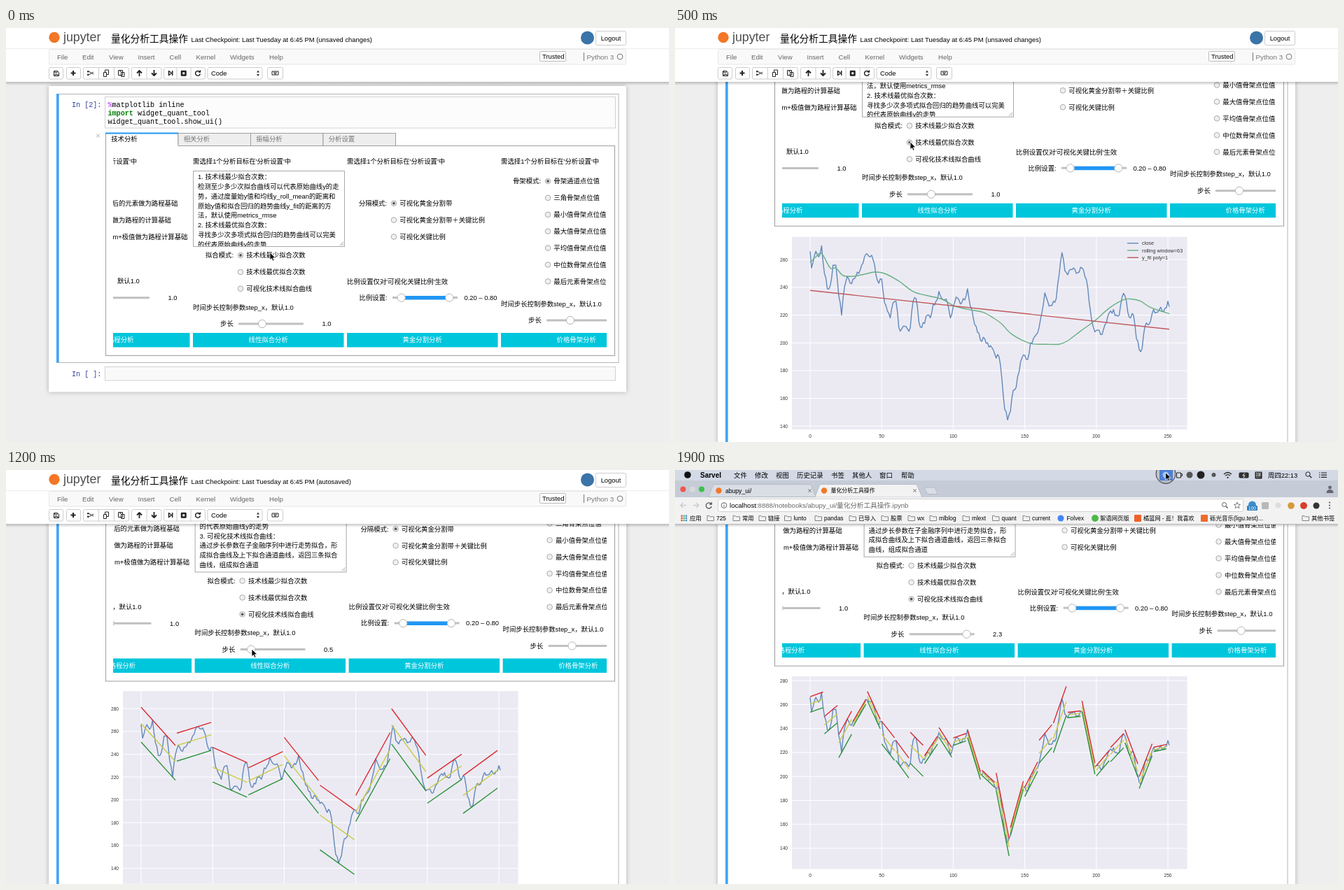
An HTML page that plays this animation: 947x592 px, repeating every 2 s.

```html
<!DOCTYPE html>
<html lang="zh">
<head>
<meta charset="utf-8">
<title>量化分析工具操作</title>
<style>
html, body { margin: 0; width: 100%; height: 100%; overflow: hidden; background: #eee; }
svg { display: block; width: 947px; height: 592px; }
text { font: 9.4px "Liberation Sans", "Noto Sans CJK SC", "Noto Sans CJK", sans-serif; white-space: pre; }
text.mono { font-family: "Liberation Mono", monospace; }
</style>
</head>
<body>
<svg id="stage" viewBox="0 0 947 592"></svg>
<script>
const stage = document.getElementById('stage');

// Drawing helpers; text is centred vertically on y.
const text = (x, y, s, { size = 9.4, fill = '#000', anchor = 'start', weight = 400, mono = false } = {}) =>
  `<text x="${x}" y="${y + size * .37}" fill="${fill}" text-anchor="${anchor}" class="${mono ? 'mono' : ''}" style="font-size:${size}px;font-weight:${weight}">${s}</text>`;
const rect = (x, y, w, h, fill = 'none', stroke = 'none', rx = 0) =>
  `<rect x="${x}" y="${y}" width="${w}" height="${h}" fill="${fill}" stroke="${stroke}" rx="${rx}"/>`;
const circle = (x, y, r, fill = 'none', stroke = 'none') =>
  `<circle cx="${x}" cy="${y}" r="${r}" fill="${fill}" stroke="${stroke}"/>`;
const path = (d, stroke = '#333', width = 1, fill = 'none') =>
  `<path d="${d}" fill="${fill}" stroke="${stroke}" stroke-width="${width}" stroke-linejoin="round"/>`;
const group = (x, y, body, attrs = '') => `<g transform="translate(${x} ${y})" ${attrs}>${body}</g>`;

// Closing prices of every second day; the days between are interpolated with a small wobble.
const prices = [
  266, 258, 266, 262, 270, 250, 239, 241, 256, 256, 234, 220, 240, 248, 243, 246, 248, 250, 256, 262, 264,
  262, 260, 249, 243, 246, 229, 223, 218, 229, 230, 211, 210, 212, 210, 211, 230, 232, 215, 211, 214, 220,
  218, 228, 230, 237, 232, 231, 229, 218, 226, 233, 231, 229, 231, 239, 226, 218, 212, 207, 201, 203, 200,
  198, 195, 189, 190, 174, 152, 144.5, 151, 166, 168, 179, 189, 191, 188, 200, 203, 206, 211, 222, 236, 230,
  227, 230, 232, 249, 265, 252, 249, 253, 254, 250, 251, 254, 248, 240, 222, 211, 209, 209, 206, 213, 219,
  223, 224, 220, 220, 233, 234, 222, 218, 220, 203, 195, 196, 212, 213, 216, 224, 222, 224, 223, 225, 230, 226];
const close = Array.from({ length: 252 }, (_, d) => {
  const k = d >> 1;
  return d % 2 ? (prices[k] + prices[k + 1]) / 2 + 2.2 * Math.sin(d * d) : prices[k];
});
close[1] = 254;
close[251] = 226;

const rolling = [[0, 258], [4, 262], [8, 264.5], [14, 254], [18, 254], [23, 248.5], [30, 248], [38, 249.5],
  [45, 251], [52, 250], [62, 244.5], [72, 237], [82, 234], [92, 231.5], [101, 226.5], [111, 224], [121, 222],
  [128, 218], [134, 213.5], [140, 207], [148, 202], [155, 199.3], [165, 199], [174, 199], [180, 201.5],
  [189, 208.5], [199, 216], [209, 225], [219, 231], [225, 231.5], [231, 230], [238, 225.5], [251, 221]];
const poly9 = [[0, 285.6], [3.4, 262], [6.8, 248], [10.8, 242.5], [15.7, 245], [23, 252.4], [28, 254],
  [33.8, 252], [42.6, 243], [52.3, 231], [59.7, 225.3], [66, 223.7], [74.4, 225.3], [84, 227.6], [91.5, 228],
  [98.8, 226], [108.6, 217.5], [120.8, 201], [130.6, 189.3], [139.4, 185], [147.7, 188.7], [157.5, 203.4],
  [169.8, 227], [179.5, 243.4], [188.4, 248], [195.2, 246], [204, 232], [213.8, 212], [221.1, 203.4],
  [226, 204.5], [233.4, 216.3], [239.2, 229], [244.1, 233], [248, 225.3], [251, 206.8]];

// top: page y of the plot; ref280: offset of price 280; scale: pixels per price unit.
const charts = {
  poly1: { top: 484, ref280: -7.2, scale: 1.984, fit: [[0, 237.8], [251, 209.8]], label: 'y_fit poly=1' },
  poly9: { top: 503, ref280: 22, scale: 1.768, fit: poly9, label: 'y_fit poly=9',
    note: 'metrics_func rolling_mean=23.73666874753794, metrics_func y_fit=13.678487738715285' },
  step25: { top: 482.7, ref280: 25, scale: 1.631, segment: 25 },
  step50: { top: 484.3, ref280: 21.5, scale: 1.556, segment: 50 },
  step10: { top: 483.4, ref280: 6, scale: 1.714, segment: 10 }
};
const BLUE = '#6289ba', GREEN = '#68b083', RED = '#c0595d';
const dayX = d => 193 + d * 2.044;

function smooth(pts) {
  let d = `M${pts[0]}`;
  for (let i = 0; i < pts.length - 1; i++) {
    const [p0, p1, p2, p3] = [pts[i - 1] || pts[i], pts[i], pts[i + 1], pts[i + 2] || pts[i + 1]];
    d += `C${[0, 1].map(a => p1[a] + (p2[a] - p0[a]) / 6)} ${[0, 1].map(a => p2[a] - (p3[a] - p1[a]) / 6)} ${p2}`;
  }
  return d;
}

// Least-squares line per segment, shifted to its highest and lowest residual.
function channel(n, toY) {
  let out = '';
  for (let s = 0; s + n <= close.length; s += n) {
    const ys = close.slice(s, s + n), mid = (n - 1) / 2;
    const mean = ys.reduce((a, b) => a + b) / n;
    const slope = ys.reduce((a, y, i) => a + (i - mid) * (y - mean), 0) / (n * (n * n - 1) / 12);
    const rest = ys.map((y, i) => y - mean - slope * (i - mid));
    const line = (shift, color) => path(
      `M${dayX(s)} ${toY(mean - slope * mid + shift)}L${dayX(s + n - 1)} ${toY(mean + slope * mid + shift)}`, color, 1.4);
    out += line(0, '#cbcb45') + line(Math.max(...rest), '#dc2b30') + line(Math.min(...rest), '#2c9138');
  }
  return out;
}

function drawChart({ top, ref280, scale, fit, label, note, segment }) {
  const toY = p => top + ref280 + (280 - p) * scale;
  const curve = pts => smooth(pts.map(([d, p]) => [dayX(d), toY(p)]));
  const tick = { size: 6.6, fill: '#333' };
  let out = rect(167, top, 564.5, 275.5, '#ebeaf3');
  for (let d = 0; d <= 250; d += 50)
    out += path(`M${dayX(d)} ${top}v275.5`, '#fff') + text(dayX(d), top + 284.5, d, { ...tick, anchor: 'middle' });
  for (let p = 120; p <= 280; p += 20) {
    const y = toY(p);
    if (y > top && y < top + 275.5) out += path(`M167 ${y}h564.5`, '#fff') + text(161, y, p, { ...tick, anchor: 'end' });
  }
  out += path('M' + close.map((p, d) => `${dayX(d)} ${toY(p)}`).join('L'), BLUE, 1.4);
  if (segment) return out + channel(segment, toY);
  out += path(curve(rolling), GREEN, 1.4) + path(curve(fit), RED, 1.4);
  [['close', BLUE], ['rolling window=63', GREEN], [label, RED]].forEach(([name, color], i) => {
    const y = top + 9 + i * 10.3;
    out += path(`M646 ${y}h16`, color, 1.4) + text(667, y, name, { size: 7.3, fill: '#333' });
  });
  if (note) out += rect(140, 475, 721.5, 19.5, '#fddfe0') + text(144, 485, note, { size: 10.12, mono: true });
  return out;
}

const help = ['1. 技术线最少拟合次数：', '检测至少多少次拟合曲线可以代表原始曲线y的走', '势，通过度量始y值和均线y_roll_mean的距离和',
  '原始y值和拟合回归的趋势曲线y_fit的距离的方', '法，默认使用metrics_rmse', '2. 技术线最优拟合次数：',
  '寻找多少次多项式拟合回归的趋势曲线可以完美', '的代表原始曲线y的走势', '3. 可视化技术线拟合曲线：',
  '通过步长参数在子金融序列中进行走势拟合，形', '成拟合曲线及上下拟合通道曲线，返回三条拟合', '曲线，组成拟合通道'];

const radios = (x, y, label, items, checked) => text(x - 10, y, label, { anchor: 'end' }) +
  items.map((item, i) => {
    const cy = y + i * 23.9;
    return circle(x, cy, 3.8, '#f0f0f0', '#aaa') + (i === checked ? circle(x, cy, 1.9, '#555') : '') + text(x + 8.3, cy, item);
  }).join('');
const thumb = (x, y) => circle(x, y, 5.6, '#fff', '#b5b5b5');
const stepSlider = (x, y, value) => text(x, y - 23.8, '时间步长控制参数step_x，默认1.0') + text(x + 39, y, '步长') +
  rect(x + 65, y - 1.5, 93, 3, '#c0c0c0', 'none', 1) + thumb(x + 99 + (value - 1) * 36.8, y) +
  text(x + 184.5, y, value.toFixed(1));

function drawPanel(s) {
  let out = '';
  ['路程分析', '线性拟合分析', '黄金分割分析', '价格骨架分析'].forEach((name, i) => {
    const x = 47 + i * 220;
    out += text(x, 190.5, "需选择1个分析目标在'分析设置'中") + rect(x, 436, 215.5, 20.5, '#00c6dc') +
      text(x + 107.7 + (i ? 0 : 9), 446, name, { fill: '#fff', anchor: 'middle', weight: 500 });
  });
  out += text(245.3, 250.5, '后的元素做为路程基础', { anchor: 'end' }) + text(236, 274.5, '做为路程的计算基础', { anchor: 'end' }) +
    text(259.5, 298.5, 'm+极值做为路程计算基础', { anchor: 'end' }) + stepSlider(47, 385.7, 1);
  out += rect(267.5, 204.5, 216, 108, '#fff', '#a9a9a9') +
    `<g clip-path="url(#help)">${help.map((l, i) => text(274, 212.7 + i * 13.8 - s.helpScroll, l)).join('')}</g>` +
    path('M477 311l5-5M480 311l2-2', '#777', .7);
  out += radios(335, 325, '拟合模式:', ['技术线最少拟合次数', '技术线最优拟合次数', '可视化技术线拟合曲线'], s.mode) +
    stepSlider(267, 423, s.step);
  out += radios(554, 250.7, '分隔模式:', ['可视化黄金分割带', '可视化黄金分割带＋关键比例', '可视化关键比例'], 0) +
    text(487, 362.5, "比例设置仅对'可视化关键比例'生效") + text(504.5, 385.5, '比例设置:') +
    rect(552, 384, 93, 3, '#c0c0c0') + rect(565, 383, 68, 5.5, '#2196f3') + thumb(564.7, 385.7) + thumb(633.3, 385.7) +
    text(654.5, 385.5, '0.20 – 0.80');
  out += radios(774, 219, '骨架模式:', ['骨架通道点位值', '三角骨架点位值', '最小值骨架点位值', '最大值骨架点位值',
    '平均值骨架点位值', '中位数骨架点位值', '最后元素骨架点位值'], 0) + stepSlider(707, 418, 1);
  return `<g clip-path="url(#panel)">${group(s.shift, 0, out)}</g>`;
}

function drawPage(s) {
  const bottom = s.chart ? 830 : 478.5;
  const code = { size: 10.1, mono: true };
  let out = `<g style="filter:drop-shadow(0 0 3px #0004)">${rect(61, 83, 825, bottom - 41, '#fff')}</g>` +
    rect(72.5, 94.5, 802.5, bottom - 94.5, '#fff', '#b5b5b5') + rect(72, 94, 3.7, bottom - 94, '#42a5f5') +
    text(94, 109, 'In [2]:', { ...code, fill: '#303f9f' }) + rect(141.5, 98.5, 729, 44.5, '#fcfcfc', '#d2d2d2') +
    text(145.5, 109.5, '<tspan fill="#aa22ff">%</tspan>matplotlib inline', code) +
    text(145.5, 121.5, '<tspan fill="#008000" font-weight="700">import</tspan> widget_quant_tool', code) +
    text(145.5, 133, 'widget_quant_tool.show_ui()', code) +
    path('M129 151.5l5 5m0-5l-5 5', '#aaa') +
    rect(142.5, 168.5, 727, 300, '#fff', '#9e9e9e');
  ['技术分析', '相关分析', '振幅分析', '分析设置'].forEach((name, i) => {
    const x = 142.5 + i * 103.5;
    out += rect(x, 150.5, 103.5, 18, i ? '#eee' : '#fff', '#9e9e9e') + text(x + 7.7, 158.5, name, { fill: i ? '#777' : '#000' });
  });
  out += rect(143, 167, 102.5, 3, '#fff') + rect(142, 149.5, 104, 2, '#2196f3') + drawPanel(s) +
    text(94, bottom + 16, 'In [ ]:', { ...code, fill: '#303f9f' }) + rect(141.5, bottom + 6, 729, 19.5, '#f9f9f9', '#d2d2d2');
  if (s.chart) out += drawChart(charts[s.chart]);
  return group(0, -s.scroll, out);
}

const toolbarIcons = [
  ['M68.5 61.5h5l2 2v5h-7zM70 61.5v2.5h3v-2.5M70 68.5v-2h4v2'], ['M96 61v7M92.5 64.5h7', 2],
  ['M118 62l7 4M118 67l7-4M116.5 61.5h1.5v1.5h-1.5zM116.5 66h1.5v1.5h-1.5z'], ['M139.5 63.5h4v6h-4zM141.5 63v-3h5v6.5h-3'],
  ['M160.5 60.5h6v7h-6zM164.5 63.5h4.5v6h-4.5zM162 62h3'], ['M190.5 69v-7M187 64.5l3.5-3.5 3.5 3.5', 1.8],
  ['M211.5 60v7M208 64.5l3.5 3.5 3.5-3.5', 1.8], ['M232.5 61.5l4 3-4 3zM237.7 61v7', 1.5],
  ['M251 62h5.5v5.5h-5.5z', 2.5], ['M276.5 62.5a3.4 3.4 0 1 0 .8 3M277.5 60.5v2.5h-2.5', 1.5],
  ['M380 62h9v5h-9zM382 63.8h5M383 65.5h3']];

function drawHeader(s) {
  const gray = { fill: '#777' };
  let out = '<rect y="77" width="947" height="5" fill="url(#shade)"/>' + rect(0, 0, 947, 77, '#fff') +
    circle(69, 13.5, 7.7, '#f37726') + text(82, 12.5, 'jupyter', { size: 17.8, fill: '#4e4e4e' }) +
    text(150, 15, '量化分析工具操作', { size: 13.75 }) +
    text(264.5, 16.5, `Last Checkpoint: Last Tuesday at 6:45 PM (${s.saved ? 'autosaved' : 'unsaved changes'})`) +
    circle(830.5, 14, 9.5, '#3b74a8') + rect(842.5, 4.5, 43, 20, '#fff', '#ccc', 2) + text(864, 14.5, 'Logout', { anchor: 'middle' }) +
    path('M0 29.5H947', '#ededed') + rect(61.5, 30.5, 824, 21.5, '#f9f9f9', '#e7e7e7', 1);
  [['File', 73], ['Edit', 109], ['View', 147], ['Insert', 188.5], ['Cell', 233.5], ['Kernel', 271.5], ['Widgets', 320], ['Help', 376]]
    .forEach(([name, x]) => out += text(x, 41, name, { fill: '#666', size: 9.6 }));
  if (s.notice) out += rect(687.5, 33.5, 72, 14, '#fff', '#bbb', 1) + text(691, 40.5, 'Notebook saved');
  out += rect(762.5, 33.5, 37, 14, '#fff', '#bbb', 1) + text(766, 40.3, 'Trusted') +
    path('M825.5 35v12', '#777') + text(829.5, 41.2, 'Python 3', { ...gray, size: 9.8 }) + circle(877, 41, 3.9, 'none', '#777');
  [[61.5, 20], [86.5, 20], [110.5, 65], [179.5, 42.5], [225.5, 59], [288, 78], [373.5, 22]]
    .forEach(([x, w]) => out += rect(x, 56.5, w, 16.5, '#fff', '#ccc', 2));
  out += path('M132.5 57v16M154.5 57v16M201 57v16M244 57v16M264 57v16', '#ccc');
  toolbarIcons.forEach(([d, w = 1]) => out += path(d, '#222', w));
  return out + text(293, 64.7, 'Code') + path('M358 63.5l2-3 2 3zM358 66l2 3 2-3z', 'none', 0, '#333');
}

const folder = x => path(`M${x} 65.5h3l1 1.3h5.5v5.7h-9.5z`, '#777', .9);

function drawBrowser() {
  const item = (x, s, extra) => text(x, 69, s, { size: 8.4, ...extra });
  let out = '<rect y="77" width="947" height="5" fill="url(#shade)"/>' + rect(0, 0, 947, 15, '#d3dae6') + circle(18, 7, 4.8, '#111') +
    text(36, 7.3, 'Sarvel', { weight: 700, size: 10 });
  [['文件', 84], ['修改', 114], ['视图', 144], ['历史记录', 174], ['书签', 223], ['其他人', 253], ['窗口', 292], ['帮助', 323]]
    .forEach(([name, x]) => out += text(x, 7.3, name));
  out += path('M716.5 4h6v7h-6zM722 5.5h2.5v3h-2.5', '#222') + circle(735, 7, 4.5, '#555') + circle(751, 7, 5.5, '#222') + circle(769.5, 7, 3, '#555') +
    path('M784 6q5.5-5 11 0M786 8.2q3.5-3 7 0M788.5 10.3l1 1 1-1', '#222', 1.3) + rect(806, 4, 13, 7, '#333', '#222', 1) +
    path('M813.5 4.5l-2.5 3.5h3l-2 3', '#fff', .9) + rect(828.5, 2.5, 10, 10, '#222', 'none', 1) +
    text(833.5, 7.5, '拼', { size: 8, fill: '#fff', anchor: 'middle' }) + text(847, 7.3, '周四22:13') +
    circle(904, 6, 3.2, 'none', '#222') + path('M906.3 8.3l3 3', '#222', 1.3) + path('M920 4h1.5M923 4h8M920 7.2h1.5M923 7.2h8M920 10.4h1.5M923 10.4h8', '#222', 1.2);
  out += rect(0, 15, 947, 24, '#c5ccd7') + circle(11.5, 27.5, 4, '#f2554e') + circle(25, 27.5, 4, '#d7d9dc') + circle(38, 27.5, 4, '#3dc04a') +
    path('M48 38.5l6-16q1-2 3-2h135q2 0 3 2l6 16z', '#aeb5c0', .8, '#d9dde4') +
    path('M200 39l6-16.5q1-2 3-2h134q2 0 3 2l7 16.5z', '#aeb5c0', .8, '#f2f2f3') + path('M356 25h15l4.5 9.5h-15z', '#aeb5c0', .8, '#d9dde4') +
    circle(62.5, 29.5, 4.2, '#f37726') + text(72, 29.5, 'abupy_ui/', { size: 8.6 }) + circle(213, 29.5, 4.2, '#f37726') +
    text(222.5, 29.5, '量化分析工具操作', { size: 7.9 }) + path('M190.5 27.5l4 4m0-4l-4 4M340.5 27.5l4 4m0-4l-4 4', '#555') +
    circle(935.5, 25, 2.4, '#667') + path('M930.5 33q0-5 5-5t5 5z', 'none', 0, '#667');
  out += rect(0, 39, 947, 39, '#f2f2f3') + path('M0 77.5H947', '#bbb') + rect(61.5, 41.5, 750, 18, '#fff', '#d2d2d2', 2) +
    path('M16 50.5H8m3.5-3.5L8 50.5l3.5 3.5M26 50.5h8m-3.5-3.5l3.5 3.5-3.5 3.5', '#ccc', 1.3) +
    path('M51.5 48.5a4 4 0 1 0 .7 3.5M52.3 46v3h-3', '#555', 1.3) + circle(70, 50.5, 3.9, 'none', '#666') + path('M70 50v2.7M70 48v1', '#666') +
    text(78, 50.7, 'localhost<tspan fill="#666">:8888/notebooks/abupy_ui/量化分析工具操作.ipynb</tspan>', { size: 9.6 }) +
    circle(784.5, 49.5, 3, 'none', '#555') + path('M787 52l2.5 2.5', '#555', 1.4) +
    path('M803 46l1.3 3 3.2.3-2.4 2.1.7 3.2-2.8-1.7-2.8 1.7.7-3.2-2.4-2.1 3.2-.3z', '#666', .9) +
    circle(824.5, 50, 5.5, '#3a8ec9') + rect(817, 51, 15, 7, '#2f80c0', 'none', 1) + text(824.5, 54.5, '100', { size: 6.5, fill: '#fff', anchor: 'middle' }) +
    rect(838, 46, 10, 10, '#b9b9b9', 'none', 1) + circle(861.5, 50.5, 4, '#ddd') + circle(880, 51, 4.8, '#d79a3a') +
    circle(898, 51, 5, '#d8402c') + circle(916, 51, 4.5, '#333') + [46.5, 50.5, 54.5].map(y => circle(935, y, 1.1, '#555')).join('');
  for (let i = 0; i < 9; i++) out += rect(8.5 + i % 3 * 3.2, 64.5 + (i / 3 | 0) * 3.2, 2.3, 2.3, ['#e0563f', '#4b8', '#48c'][i % 3]);
  out += item(21, '应用');
  [['725', 59], ['常用', 96], ['链接', 133], ['lunto', 169.5], ['pandas', 213], ['已导入', 262], ['股票', 308], ['wx', 346],
    ['mlblog', 377], ['mlext', 424], ['quant', 466.5], ['current', 510], ['其他书签', 909]]
    .forEach(([name, x]) => out += folder(x - 13) + item(x, name));
  return out + circle(551, 69, 4.5, '#4285f4') + item(559.5, 'Folvex') + circle(600, 69, 5, '#4fb848') + item(607, '絮语网页版') +
    rect(656, 64, 10, 10, '#f0602a', 'none', 1) + item(669, '橘篮网 - 逛！我喜欢', { size: 8.2 }) +
    rect(751, 64, 10, 10, '#f06a2a', 'none', 1) + item(764, '砾光音乐(ligu.test)...', { size: 8.5 });
}

const cursors = {
  arrow: path('M0 0V10.6L2.5 8.4 4.2 12.2 6 11.4 4.4 7.7H7.8Z', '#fff', .8, '#000'),
  hand: path('M2 .8c0-1 1.6-1 1.6 0V4.5c.6-.6 1.4-.4 1.5.3.5-.5 1.4-.3 1.5.4.6-.4 1.4-.1 1.4.7V8c0 1.5-1 2-1 3H3C3 10 0 7.6 0 6.6S1.4 5.6 2 6.4Z', '#000', .9, '#fff')
};

// One entry per 100 ms; every entry lists only what changes.
const steps = [
  { scroll: 0, chart: '', mode: 0, step: 1, shift: 0, helpScroll: 0, cursor: ['arrow', 377, 321] },
  { cursor: ['hand', 371, 443] },
  { chart: 'poly1', scroll: 90, bar: [140, 306], cursor: ['arrow', 368, 436] },
  { scroll: 154, bar: [176, 306], cursor: ['arrow', 366.5, 422] },
  { scroll: 185.3, bar: [196, 306], cursor: ['arrow', 350, 250] },
  { mode: 1, bar: null, cursor: ['arrow', 336, 163] },
  { chart: 'poly9', saved: true, notice: true, cursor: ['hand', 369, 260] },
  { cursor: ['arrow', 352, 215] },
  { mode: 2, notice: false, cursor: ['arrow', 336, 187] },
  { chart: 'step25', cursor: ['hand', 361, 262] },
  { cursor: ['arrow', 368, 330] },
  { scroll: 130, shift: 2.6, helpScroll: 62.5, bar: [165, 319], cursor: ['arrow', 390, 160] },
  { scroll: 166.5, step: .5, bar: null, cursor: ['arrow', 351, 256] },
  { chart: 'step50', cursor: ['arrow', 378, 253] },
  { cursor: ['arrow', 351, 256] },
  { step: 1.6, cursor: ['arrow', 391, 256] },
  { step: 2.3, cursor: ['arrow', 416, 256] },
  { chart: 'step10', scroll: 182.5, bar: [196, 319], cursor: ['hand', 411, 277] },
  { scroll: 188.3, bar: null, browser: true, cursor: ['arrow', 640, 40] },
  { picked: true, cursor: ['arrow', 700.5, 3.5] }
];
const states = [];
steps.forEach((change, i) => states.push({ ...states[i - 1], ...change }));

const defs = `<defs>
  <clipPath id="panel"><rect x="153" y="169" width="705" height="299"/></clipPath>
  <clipPath id="help"><rect x="268" y="205" width="215" height="107"/></clipPath>
  <linearGradient id="shade" x2="0" y2="1"><stop stop-color="#000" stop-opacity=".22"/><stop offset="1" stop-color="#000" stop-opacity="0"/></linearGradient>
</defs>`;

function render(s) {
  const [kind, x, y] = s.cursor;
  stage.innerHTML = defs + rect(0, 0, 947, 592, '#eee') + drawPage(s) + (s.browser ? drawBrowser() : drawHeader(s)) +
    (s.bar ? rect(941.5, s.bar[0], 4.5, s.bar[1], '#828282', 'none', 2.2) : '') +
    (s.picked ? rect(692, 0, 19, 15, '#3b7ded') + circle(701, 5.5, 14, '#8884', '#333') + circle(701, 7, 4.5, '#9cc4ff') : '') +
    group(x, y, cursors[kind]);
}

const start = performance.now();
let shown = -1;
function tick() {
  const index = Math.floor((performance.now() - start) % 2000 / 100);
  if (index !== shown) render(states[shown = index]);
  requestAnimationFrame(tick);
}
tick();
</script>
</body>
</html>
```
